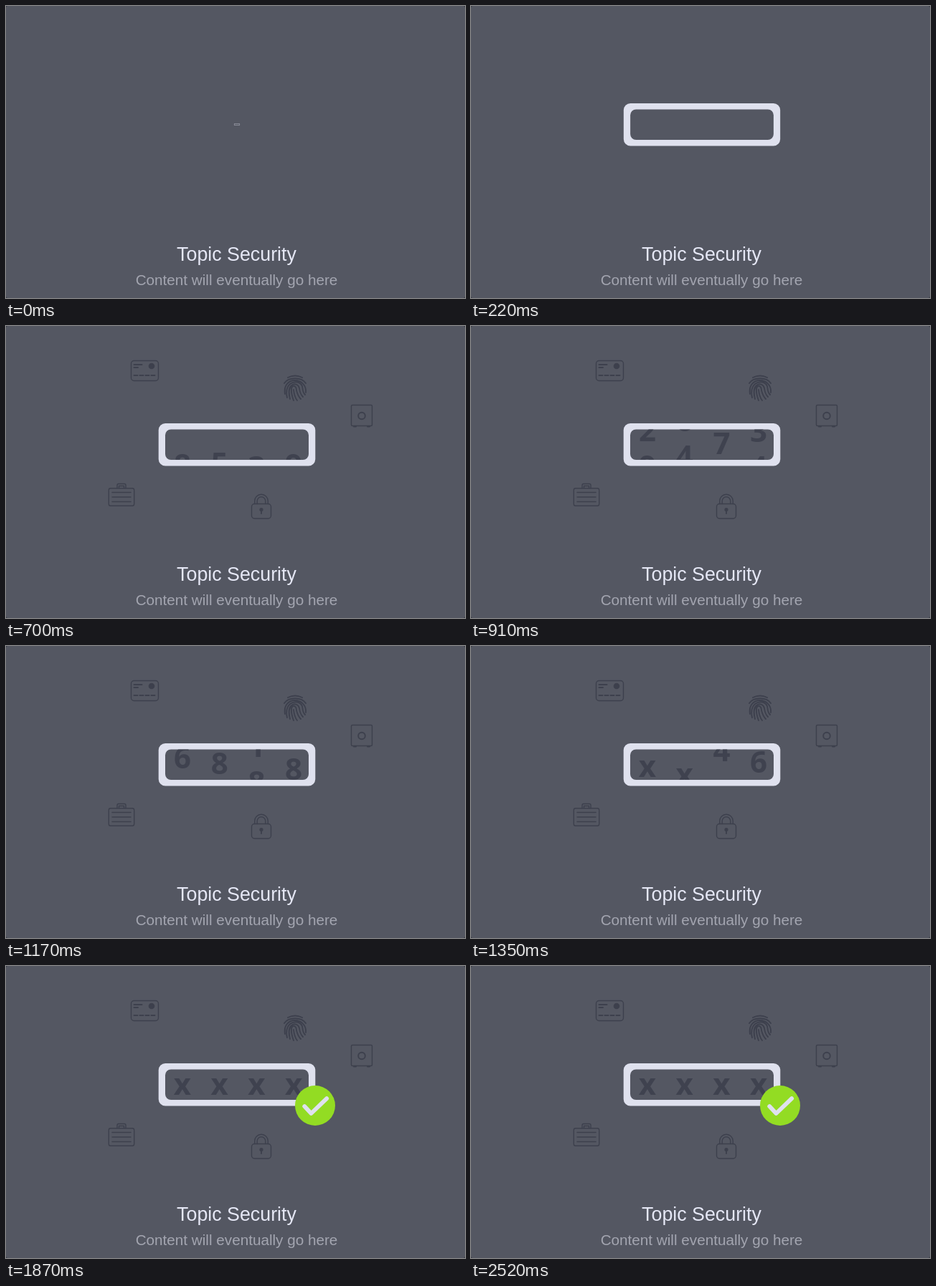
An HTML page for the animation above (2560 ms loop, 640x408 px).

```html
<!DOCTYPE html>
<html lang="en">
<head>
<meta charset="utf-8">
<title>Topic Security</title>
<style>
  html, body { margin: 0; height: 100%; overflow: hidden; background: #34363f; }
  svg { display: block; width: 100vw; height: 100vh; }
  text { text-anchor: middle; font-family: "Liberation Sans", Arial, sans-serif; }
  .reel text { font: bold 42px "Open Sans", sans-serif; fill: #3f424f; }
  .icon { fill: none; stroke: #3d404d; stroke-width: 1.4; stroke-linecap: round; stroke-linejoin: round; }
  .icon .solid { fill: #3d404d; stroke: none; }
  .icon .bold { stroke-width: 1.9; }
  .badge { fill: none; stroke-linecap: round; stroke-linejoin: round; }
</style>
</head>
<body>
<svg viewBox="0 0 640 408">
  <defs>
    <clipPath id="window"><rect x="-100" y="-21" width="200" height="42.5" rx="8"/></clipPath>
  </defs>
  <rect width="640" height="408" rx="3" fill="#545762"/>

  <g class="icon" data-at="193.5 62.5">
    <rect x="-19" y="-14" width="38" height="28" rx="4"/>
    <path class="bold" d="M-15-8.5H-4M-15-4.5H-9.5M-15 6.5h5m3 0h5m3 0h5m3 0h5"/>
    <circle class="solid" cx="9.5" cy="-6.5" r="4.3"/>
  </g>
  <g class="icon" data-at="403 87">
    <path class="bold" d="M-10-15Q0-20 10-15M-15-7C-9-16 9-16 15-7M-14 8C-18-18 17-16 15 6
      M-11 13C-17-12 10-14 10.5 0Q11 6 14 9M-7 15C-13-8 4-10 6 0Q7 8 11 12
      M-2 17C-8 0-4-4-1-3Q2-2 2 3Q4 11 8 15M-2 2Q-1 12 3 17"/>
  </g>
  <g class="icon" data-at="496 125.5">
    <rect x="-14.5" y="-15" width="29" height="29" rx="1.5"/>
    <circle class="bold" r="4.8"/>
    <path class="bold" d="M-11 15h3M8 15h3"/>
  </g>
  <g class="icon" data-at="161 236">
    <rect x="-17.7" y="-9.3" width="35.4" height="24.6" rx="2.5"/>
    <path d="M-6-9.5V-13.5Q-6-15.5-4-15.5H4Q6-15.5 6-13.5V-9.5M-3.5-9.5V-12.5H3.5V-9.5
      M-13-3.5H13M-13 3H13M-13 9.5H13"/>
  </g>
  <g class="icon" data-at="356 252">
    <rect x="-13.5" y="-3.5" width="27" height="20.5" rx="4"/>
    <path d="M-9.3-3.5V-7.5a9.3 9.3 0 0 1 18.6 0V-3.5M-5.8-3.5V-7.5a5.8 5.8 0 0 1 11.6 0V-3.5"/>
    <circle class="solid" cy="4.5" r="2.6"/>
    <path class="bold" d="M0 5V10"/>
  </g>

  <g id="panel">
    <rect x="-109.3" y="-29.5" width="218.6" height="59.5" rx="9.5" fill="#dfe1ee"/>
    <rect x="-100" y="-21" width="200" height="42.5" rx="8" fill="#545762"/>
    <g id="reels" clip-path="url(#window)"></g>
  </g>

  <g class="badge" transform="translate(431 195)">
    <g id="rays" stroke="#93dc23" stroke-width="6"></g>
    <g id="disc">
      <circle r="28" fill="#93dc23"/>
      <path d="M-14.8 1L-5.5 11L16.2-9.8" stroke="#dfe1ee" stroke-width="5.8"/>
    </g>
  </g>

  <text x="321.5" y="355.5" font-size="26.8" fill="#e5e7f5">Topic Security</text>
  <text x="321.5" y="389.5" font-size="20.7" fill="#a3a5b0">Content will eventually go here</text>
</svg>
<script>
const LOOP = 2560, STEPS = 59, STEP = LOOP / STEPS, ROW = 50;
const $ = id => document.getElementById(id);

const linear = p => p;
const easeIn = p => p * p;
const easeOut = p => 1 - (1 - p) ** 2;
const easeInOut = p => (1 - Math.cos(Math.PI * p)) / 2;

// Value at time t along [time, value, easing into this key] entries.
function track(t, keys) {
  if (t <= keys[0][0]) return keys[0][1];
  for (let i = 1; i < keys.length; i++) {
    const [t0, v0] = keys[i - 1], [t1, v1, ease] = keys[i];
    if (t < t1) return v0 + (v1 - v0) * ease((t - t0) / (t1 - t0));
  }
  return keys[keys.length - 1][1];
}

function add(parent, tag, attrs, text = "") {
  const node = document.createElementNS("http://www.w3.org/2000/svg", tag);
  for (const name in attrs) node.setAttribute(name, attrs[name]);
  node.textContent = text;
  return parent.appendChild(node);
}

// Each reel: symbols, rows scrolled at two moments, and when it stops.
const reels = [
  ["829365x", 1.36, 4.16, 1390],
  ["564182x", 1.64, 4, 1450],
  ["375184x", 1, 3.48, 1519],
  ["934286x", 1.34, 3.84, 1690],
].map(([symbols, mid, late, end], i) => {
  const node = add($("reels"), "g", { class: "reel" });
  [...symbols].forEach((s, k) => add(node, "text", { x: -76 + 51.7 * i, y: 14 + ROW * k }, s));
  const keys = [[540, -1], [911, mid, easeIn], [1171, late, linear], [end, symbols.length - 1, easeOut]];
  return { node, keys };
});

const rays = [-7, 42.5, 93].map(a => add($("rays"), "path", { transform: `rotate(${a})` }));
const icons = [...document.querySelectorAll(".icon")];

const panelKeys = [[0, 0.037], [326, 1.12, easeOut], [433, 1, easeInOut]];
const iconKeys = [[240, 0], [433, 1, easeOut]];
const discKeys = [[1345, 0], [1519, 1.235, easeOut], [1780, 1, easeInOut]];
const tipKeys = [[1390, 10], [1519, 45, linear], [1690, 52, easeOut]];
const tailKeys = [[1390, 10], [1519, 38, linear], [1865, 52, easeOut]];

function draw(t) {
  $("panel").setAttribute("transform", `translate(322 165.5) scale(${track(t, panelKeys)})`);
  const size = track(t, iconKeys);
  for (const icon of icons) icon.setAttribute("transform", `translate(${icon.dataset.at}) scale(${size})`);
  for (const { node, keys } of reels) node.setAttribute("transform", `translate(0 ${-ROW * track(t, keys)})`);

  $("disc").setAttribute("transform", `scale(${track(t, discKeys)})`);
  $("rays").setAttribute("visibility", t > 1390 && t < 1860 ? "visible" : "hidden");
  for (const ray of rays) ray.setAttribute("d", `M${track(t, tailKeys)} 0H${track(t, tipKeys)}`);
  $("rays").setAttribute("stroke-width", track(t, [[1690, 6], [1865, 0, easeIn]]));
}

const start = performance.now();
function tick() {
  const t = (performance.now() - start) % LOOP;
  draw(Math.min(STEPS - 1, Math.floor((t + 5) / STEP)) * STEP);
  requestAnimationFrame(tick);
}
tick();
</script>
</body>
</html>
```
